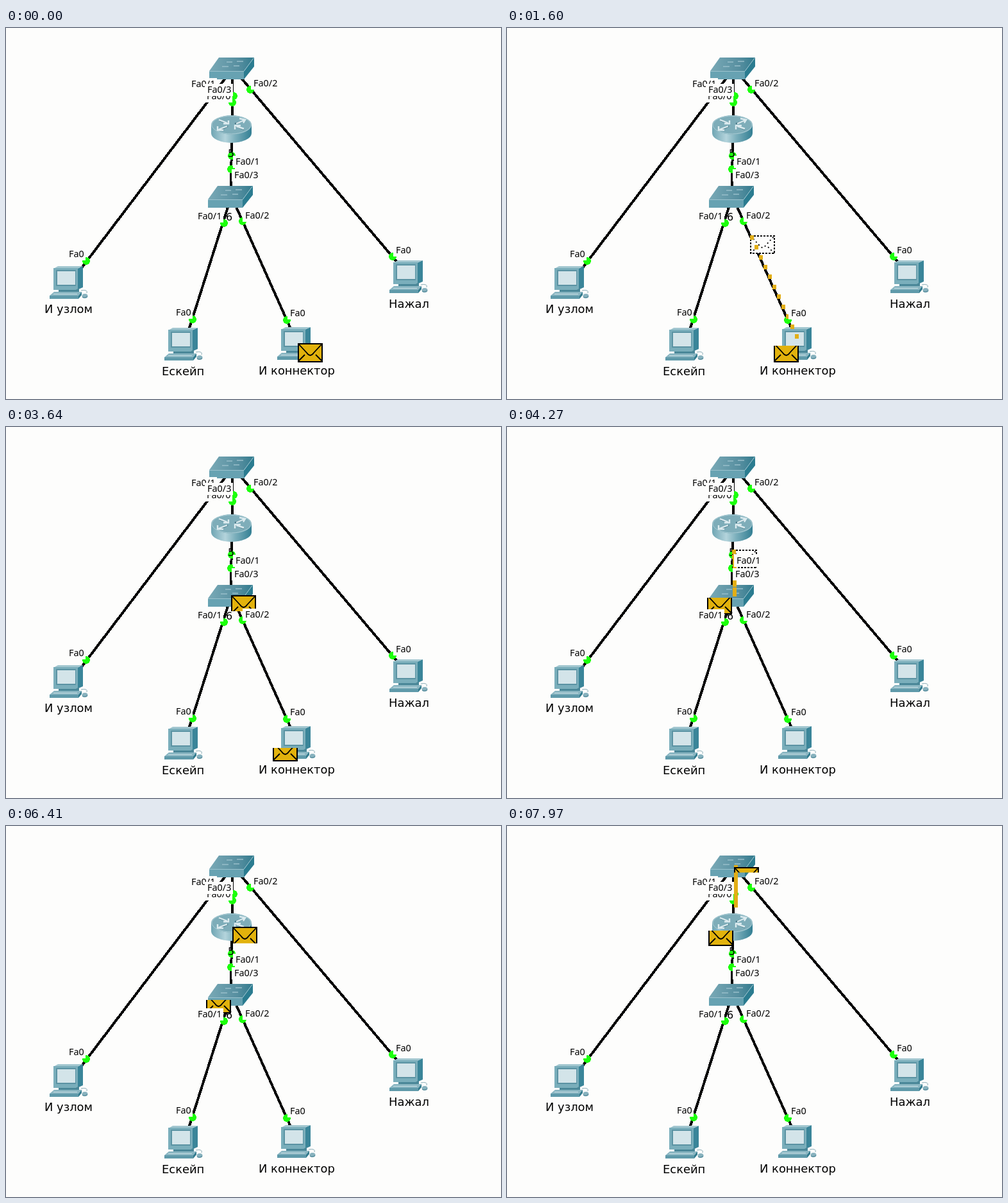
Recreate the animation shown at these times as an HTML page. Size 772 by 578 pixels, loop 8000 ms.

```html
<!DOCTYPE html>
<html lang="ru">
<head>
<meta charset="utf-8">
<title>Network packet</title>
<style>
  html, body { margin: 0; width: 100%; height: 100%; overflow: hidden; background: #fdfdfc; }
  svg { display: block; width: 772px; height: 578px; }
  .name { font: 17.9px "DejaVu Sans", sans-serif; }
  .digit { font: 16px "DejaVu Sans", sans-serif; }
  .port { font: 14.4px "Noto Sans", sans-serif; }
  .links { stroke: #000; stroke-width: 4; shape-rendering: crispEdges; }
  .box { fill: #fdfdfc; }
  .light { fill: #1cff0a; shape-rendering: crispEdges; }
  .flap { fill: none; stroke: #000; stroke-width: 1.8; }
</style>
</head>
<body>
<svg viewBox="0 0 772 578">
  <defs>
    <linearGradient id="top">
      <stop offset="0" stop-color="#79a9b6"/><stop offset=".65" stop-color="#578fa0"/><stop offset="1" stop-color="#327b8e"/>
    </linearGradient>
    <linearGradient id="wall">
      <stop offset="0" stop-color="#6fa5b3"/><stop offset=".35" stop-color="#b4d4dc"/>
      <stop offset=".6" stop-color="#7aaebb"/><stop offset="1" stop-color="#337f93"/>
    </linearGradient>

    <g id="switch">
      <path fill="url(#top)" d="M15 0H70L54 21H0Z"/>
      <path fill="#67a2b2" d="M0 21H54V34H0Z"/>
      <path fill="#2b7c90" d="M54 21L70 0V14L54 34Z"/>
      <path fill="none" stroke="#9cc3ce" d="M0 21.5H54L69 1"/>
      <path fill="none" stroke="#98bfca" stroke-width="1.4" d="M27 7H36M43 6H53M20 14H30M38 13H47"/>
    </g>

    <g id="router">
      <path fill="url(#wall)" d="M0 15V28A31.5 15 0 0 0 63 28V15Z"/>
      <ellipse cx="31.5" cy="15" rx="31.5" ry="15" fill="#7eadb9"/>
      <ellipse cx="31.5" cy="15" rx="30.5" ry="14" fill="none" stroke="#aacdd6"/>
      <path fill="none" stroke="#3d6f7e" stroke-width="2" d="M13 8L27 13M50 9L37 13M13 23L26 17M51 22L38 17"/>
      <path fill="none" stroke="#dcebef" stroke-width="2.4" d="M12 7L25 12M19 13H27V8M51 8L39 13M44 5L53 7L50 12M12 22L25 17M10 17V23H19M51 21L39 17M37 22V16H46"/>
    </g>

    <g id="pc">
      <path fill="#3a8599" d="M43 4L52 0V33L43 37Z"/>
      <path fill="#a3c7d0" d="M6 4L13 0H52L43 4Z"/>
      <path fill="#7aaebb" d="M6 3H44V37H6Z"/>
      <path fill="#5b93a3" d="M10 6H41V31H10Z"/>
      <path fill="#d3e4e9" d="M12 8H40V29H12Z"/>
      <path fill="#4a8798" d="M14 37H41L46 34V40H14Z"/>
      <path fill="#8ab6c2" d="M7 40H50L45 46H0Z"/>
      <path fill="#5f9aaa" d="M0 46H45V51H0Z"/>
      <path fill="#327b8e" d="M45 46L50 40V45L45 51Z"/>
      <path fill="none" stroke="#c9dfe5" d="M6 43.5H43"/>
      <path fill="none" stroke="#86aab4" d="M49 38Q60 36 58 42"/>
      <ellipse cx="55" cy="46.5" rx="4.5" ry="3.5" fill="#88b2be"/>
      <path fill="none" stroke="#437f90" d="M51 48Q55 51 59 47"/>
    </g>

    <g id="flap">
      <path d="M1 1L14 15Q19.5 23 25 15L38 1M1 28L11 18M38 28L28 18"/>
    </g>
    <g id="mail">
      <path fill="#e2b20c" stroke="#000" stroke-width="2" d="M1 1H38V29H1Z"/>
      <use href="#flap" class="flap"/>
    </g>
    <clipPath id="sentClip"><rect id="sentCut" width="39" height="30"/></clipPath>
    <clipPath id="heldClip"><rect id="heldCut" width="39" height="30"/></clipPath>
  </defs>

  <g class="links" id="links"></g>
  <use href="#switch" x="317" y="46"/>
  <use href="#router" x="320" y="136"/>
  <use href="#switch" x="315" y="246"/>
  <use href="#pc" x="68" y="371"/>
  <use href="#pc" x="247" y="467"/>
  <use href="#pc" x="423" y="466"/>
  <use href="#pc" x="598" y="362"/>
  <g class="light" id="lights"></g>
  <g id="names"></g>

  <g id="flying">
    <path fill="#fdfdfc" stroke="#000" stroke-width="2" stroke-dasharray="3 2" d="M1 1H38V28H1Z"/>
    <use href="#flap" class="flap" stroke-dasharray="2 4"/>
  </g>
  <g id="trail" fill="#e2ae16"></g>
  <g id="sent"><use href="#mail" clip-path="url(#sentClip)"/></g>
  <g id="held"><use href="#mail" clip-path="url(#heldClip)"/></g>
  <g id="ports"></g>
</svg>

<script>
const $ = id => document.getElementById(id);

function add(parent, tag, attrs, text) {
  const node = document.createElementNS('http://www.w3.org/2000/svg', tag);
  for (const key in attrs) node.setAttribute(key, attrs[key]);
  if (text) node.textContent = text;
  return $(parent).appendChild(node);
}

[[353, 64, 98, 400], [355, 64, 627, 385], [353, 64, 353, 157],
 [352, 157, 351, 262], [351.5, 262, 277.5, 494], [351.5, 262, 454.5, 492]]
  .forEach(([x1, y1, x2, y2]) => add('links', 'line', { x1, y1, x2, y2 }));

[['И узлом', 60, 444], ['Ескейп', 243, 541], ['И коннектор', 394, 540], ['Нажал', 597, 436]]
  .forEach(([text, x, y]) => add('names', 'text', { x, y, class: 'name' }, text));
[['5', 346, 201], ['6', 343, 300]]
  .forEach(([text, x, y]) => add('names', 'text', { x, y, class: 'digit' }, text));

[[125, 363], [603, 356], [381, 96], [353, 116], [355, 106], [352, 199],
 [351, 220], [340, 304], [369, 301], [291, 454], [438, 455]]
  .forEach(([cx, cy]) => add('lights', 'circle', { cx, cy, r: 6 }));

// Each port label hides what lies beneath its padded box.
[['Fa0/1', 289, 92], ['Fa0/0', 313, 111], ['Fa0/3', 314, 101], ['Fa0/2', 386, 91],
 ['Fa0/1', 358, 213], ['Fa0/3', 356, 234], ['Fa0/1', 299, 298], ['Fa0/2', 373, 297],
 ['Fa0', 98, 357], ['Fa0', 608, 351], ['Fa0', 265, 448], ['Fa0', 443, 449]]
  .forEach(([text, x, y]) => {
    add('ports', 'rect', { x: x - 4, y: y - 14, width: text.length > 3 ? 44 : 30, height: 19, class: 'box' });
    add('ports', 'text', { x, y, class: 'port' }, text);
  });

const LOOP = 8000, TRAVEL = 750, TAIL_DELAY = 1110, STEPS = 14;
const stops = [[455, 491], [351, 262], [353, 157], [354, 64]];
const hops = [
  { start: 1055, from: [452, 480], to: [354, 264] },
  { start: 3775, from: [355, 260], to: [354, 158] },
  { start: 6605, from: [357, 155], to: [357, 64] }
];
const dots = Array.from({ length: STEPS + 1 }, () => add('trail', 'rect', { width: 6, height: 7 }));

function place(node, x, y) {
  node.setAttribute('transform', `translate(${x} ${y})`);
}
function show(node, visible) {
  node.style.display = visible ? '' : 'none';
}
function along(hop, step) {
  return hop.from.map((v, i) => Math.round(v + (hop.to[i] - v) * step / STEPS));
}

function draw(time) {
  const index = hops.filter(hop => time >= hop.start).length - 1;
  const hop = hops[index];
  const age = hop ? time - hop.start : 0;
  const head = Math.floor(age / TRAVEL * STEPS);
  const tail = Math.ceil((age - TAIL_DELAY) / TRAVEL * STEPS);
  const arrived = hop && age >= TRAVEL;

  dots.forEach((dot, i) => {
    const visible = hop && i <= head && i >= tail;
    show(dot, visible);
    if (visible) {
      const [x, y] = along(hop, i);
      place(dot, x - 3, y - 3);
    }
  });

  show($('flying'), hop && !arrived);
  if (hop && !arrived) {
    const [x, y] = along(hop, head);
    place($('flying'), x - 3, y - 3);
  }

  // The sent envelope slowly loses its top edge.
  show($('sent'), hop);
  if (hop) {
    const [x, y] = stops[index];
    place($('sent'), x - 39, y);
    $('sentCut').setAttribute('y', 2.7 + age * 0.0024);
  }

  // The received envelope unrolls downwards.
  show($('held'), !hop || arrived);
  place($('held'), ...stops[index + 1]);
  $('heldCut').setAttribute('height', hop ? Math.max(0, Math.min(30, (age - TRAVEL) * 0.0136)) : 30);
}

const begin = performance.now();
function tick() {
  draw((performance.now() - begin) % LOOP);
  requestAnimationFrame(tick);
}
tick();
</script>
</body>
</html>
```
